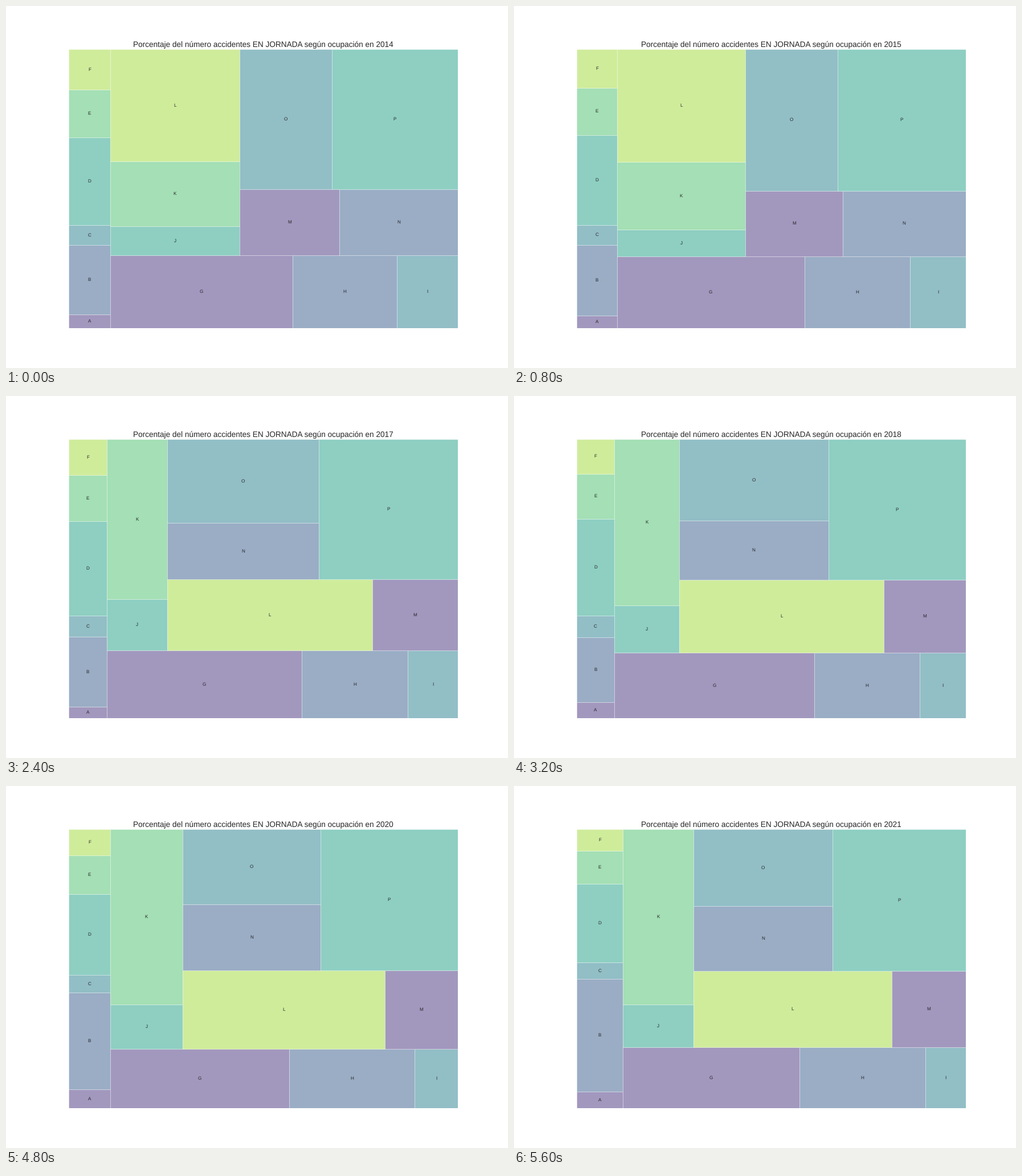
A matplotlib script for the animation above (6400 ms loop, 881x636 px).

```python
import numpy as np
import matplotlib.pyplot as plt
from matplotlib.animation import FuncAnimation
from matplotlib.patches import Rectangle

W, H, DPI = 881, 636, 64
LEFT, RIGHT, TOP, BOTTOM = 110, 793, 76, 566
PT = 0.765  # scale from layout points to points at this dpi

NAMES = "ABCDEFGHIJKLMNOP"
COLORS = ["#46327e", "#365c8d", "#277f8e", "#1fa187", "#4ac16d", "#a0da39"]
TITLE = "Porcentaje del número accidentes EN JORNADA según ocupación en {}"

# Dividing lines per year: first column edge, five cuts down that column,
# top of the bottom row, its two cuts, then six cuts of the inner block.
CUTS = {
    2014: [183, 147, 231, 385, 420, 542, 438, 503, 686,
           410, 273, 387, 322, 572, 585],
    2016: [179, 141, 222, 384, 419, 546, 442, 516, 704,
           402, 275, 399, 327, 564, 568],
    2017: [177, 139, 220, 386, 423, 546, 447, 519, 705,
           283, 357, 223, 322, 549, 643],
    2019: [175, 134, 212, 386, 425, 530, 455, 535, 719,
           296, 379, 215, 324, 555, 655],
    2020: [183, 122, 190, 332, 363, 533, 462, 497, 717,
           310, 384, 208, 324, 552, 665],
    2021: [191, 114, 172, 310, 339, 537, 459, 501, 722,
           315, 384, 211, 325, 559, 663],
}
for gap in (2015, 2018):
    CUTS[gap] = np.add(CUTS[gap - 1], CUTS[gap + 1]) / 2


def layout(year):
    """Return the boxes (x0, y0, x1, y1) of all cells by name."""
    x1, *rest = CUTS[year]
    column = [TOP, *rest[:5], BOTTOM]
    row_y, gh, hi = rest[5:8]
    x2, a, b, c, d, e = rest[8:]

    cells = {name: (LEFT, y0, x1, y1)
             for name, y0, y1 in zip("FEDCBA", column, column[1:])}
    row = [x1, gh, hi, RIGHT]
    for name, x, x_end in zip("GHI", row, row[1:]):
        cells[name] = (x, row_y, x_end, BOTTOM)

    if year < 2017:
        cells.update(
            L=(x1, TOP, x2, a), K=(x1, a, x2, b), J=(x1, b, x2, row_y),
            O=(x2, TOP, d, c), P=(d, TOP, RIGHT, c),
            M=(x2, c, e, row_y), N=(e, c, RIGHT, row_y))
    else:
        cells.update(
            K=(x1, TOP, x2, a), J=(x1, a, x2, row_y),
            O=(x2, TOP, d, b), N=(x2, b, d, c), P=(d, TOP, RIGHT, c),
            L=(x2, c, e, row_y), M=(e, c, RIGHT, row_y))
    return cells


plt.rcParams.update({
    "font.family": "Liberation Sans",
    "text.color": "0.15",
    "text.hinting": "none",
})
fig = plt.figure(figsize=(W / DPI, H / DPI), dpi=DPI, facecolor="white")
ax = fig.add_axes([LEFT / W, 1 - BOTTOM / H,
                   (RIGHT - LEFT) / W, (BOTTOM - TOP) / H])
ax.set_xlim(LEFT, RIGHT)
ax.set_ylim(BOTTOM, TOP)
ax.axis("off")
title = ax.set_title("", fontsize=20 * PT, pad=6 * PT, color="0.15")

rects, labels = {}, {}
for i, name in enumerate(NAMES):
    rects[name] = ax.add_patch(Rectangle(
        (0, 0), 1, 1, facecolor=COLORS[i % 6], edgecolor="white",
        linewidth=PT, alpha=0.5, snap=True))
    labels[name] = ax.text(0, 0, name, ha="center", va="center",
                           fontsize=12 * PT)


def draw(i):
    year = 2014 + i
    title.set_text(TITLE.format(year))
    for name, (x0, y0, x1, y1) in layout(year).items():
        rects[name].set_bounds(x0, y0, x1 - x0, y1 - y0)
        labels[name].set_position(((x0 + x1) / 2, (y0 + y1) / 2))
    return [title, *rects.values(), *labels.values()]


anim = FuncAnimation(fig, draw, frames=8, interval=800, repeat=True,
                     repeat_delay=0, blit=False)
plt.show()
```
